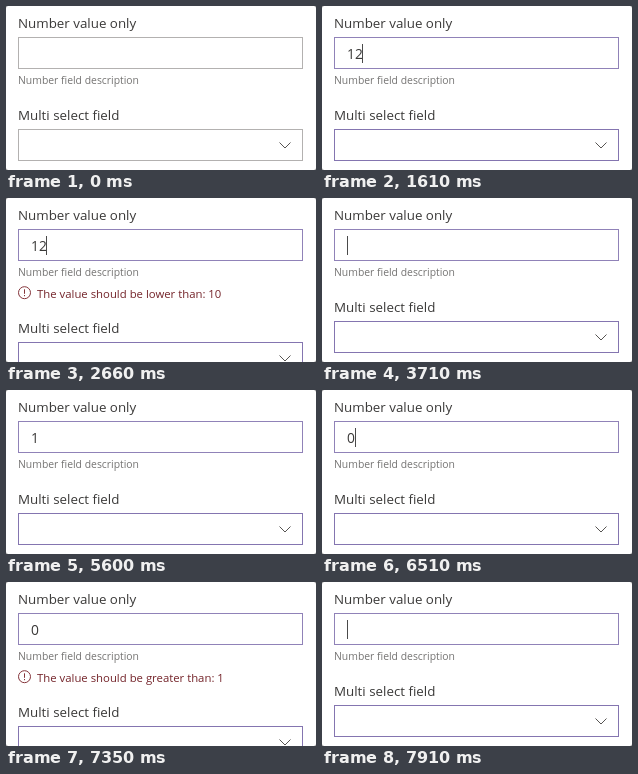
Animation of 310 by 164 pixels, one loop 8 s. Source, as an HTML page:

```html
<!DOCTYPE html>
<html lang="en">
<head>
<meta charset="utf-8">
<title>Number field validation</title>
<style>
  html, body { margin: 0; width: 100%; height: 100%; overflow: hidden; background: #8a8a8a; }
  svg { display: block; width: 310px; height: 164px; font-family: "Open Sans", "Noto Sans", sans-serif; }
  text { font-size: 13.35px; fill: #3a3938; }
  .hint { font-size: 10.4px; fill: #757473; }
  .value text { font-size: 13.8px; }
  .box { fill: #fff; stroke: #b3b1b0; }
  .chevron { fill: none; stroke: #565452; }
  .caret { fill: #4a4a4a; }

  .anim { animation: 8s step-end infinite; }
  .number { animation-name: focus; }
  .select { animation-name: tint; }
  .caret { animation-name: blink; }
  .caret rect { animation-name: move; }
  .v1 { animation-name: one; }
  .v12 { animation-name: twelve; }
  .v10 { animation-name: ten; }
  .v0 { animation-name: zero; }
  .lower { animation-name: push; }
  .high { animation-name: tooHigh; }
  .low { animation-name: tooLow; }

  .error { animation: slide 8s linear infinite; }
  .error text { font-size: 11.35px; fill: #74242a; }
  .icon { fill: none; stroke: #84343a; }

  @keyframes focus {
    6.125%, 100% { stroke: #9082b8; }
  }
  @keyframes tint {
    16.625%, 100% { stroke: #8475b0; }
  }

  /* The blink restarts on each typed digit, not on deletion. */
  @keyframes blink {
    0%, 12.25%, 26.25%, 39.375%, 56.875%, 70%, 87.5% { opacity: 0; }
    6.125%, 15.75%, 33.25%, 46.375%, 63.875%, 77%, 81.375%, 94.5%, 100% { opacity: 1; }
  }
  @keyframes move {
    0%, 38.5%, 71.75%, 98.875%, 100% { transform: translateX(0); }
    15.75%, 35.875%, 47.25%, 62.125%, 81.375% { transform: translateX(8px); }
    20.125%, 50.75% { transform: translateX(15px); }
  }

  @keyframes one {
    0%, 20.125%, 38.5%, 50.75%, 71.75%, 100% { opacity: 0; }
    15.75%, 35.875%, 47.25%, 62.125% { opacity: 1; }
  }
  @keyframes twelve {
    0%, 35.875%, 100% { opacity: 0; }
    20.125% { opacity: 1; }
  }
  @keyframes ten {
    0%, 62.125%, 100% { opacity: 0; }
    50.75% { opacity: 1; }
  }
  @keyframes zero {
    0%, 98.875%, 100% { opacity: 0; }
    81.375% { opacity: 1; }
  }

  @keyframes push {
    0%, 35.875%, 98.875%, 100% { transform: translateY(0); }
    22.75%, 84% { transform: translateY(21px); }
  }
  @keyframes tooHigh {
    0%, 35.875%, 100% { opacity: 0; }
    22.75% { opacity: 1; }
  }
  @keyframes tooLow {
    0%, 98.875%, 100% { opacity: 0; }
    84% { opacity: 1; }
  }
  @keyframes slide {
    0%, 22.75%, 84%, 100% {
      opacity: 0; transform: translateY(-20px);
      animation-timing-function: cubic-bezier(.1, .9, .2, 1);
    }
    27.3375%, 88.5875% {
      opacity: 1; transform: translateY(0);
      animation-timing-function: step-end;
    }
  }
</style>
</head>
<body>
<svg viewBox="0 0 310 164">
  <defs>
    <g id="icon" class="icon">
      <circle cx="18.5" cy="94.7" r="6"/>
      <path d="M18.5 91.3v4.5M18.5 97v1.2"/>
    </g>
  </defs>
  <rect width="310" height="164" rx="2.5" fill="#fff"/>

  <text x="12" y="22">Number value only</text>
  <rect class="box number anim" x="12.5" y="31.5" width="284" height="31"/>
  <g class="value">
    <text class="v1 anim" x="25" y="53">1</text>
    <text class="v12 anim" x="25" y="53">12</text>
    <text class="v10 anim" x="25" y="53">10</text>
    <text class="v0 anim" x="25" y="53">0</text>
  </g>
  <g class="caret anim"><rect class="anim" x="25" y="38" width="1" height="19"/></g>
  <text class="hint" x="12" y="78">Number field description</text>

  <g class="error">
    <g class="high anim">
      <use href="#icon"/>
      <text x="31" y="99.5">The value should be lower than: 10</text>
    </g>
    <g class="low anim">
      <use href="#icon"/>
      <text x="31" y="99.5">The value should be greater than: 1</text>
    </g>
  </g>

  <g class="lower anim">
    <text x="12" y="114">Multi select field</text>
    <rect class="box select anim" x="12.5" y="123.5" width="284" height="31"/>
    <path class="chevron" d="M273.5 136.5l5.5 5.5 5.5-5.5"/>
  </g>
</svg>
</body>
</html>
```
